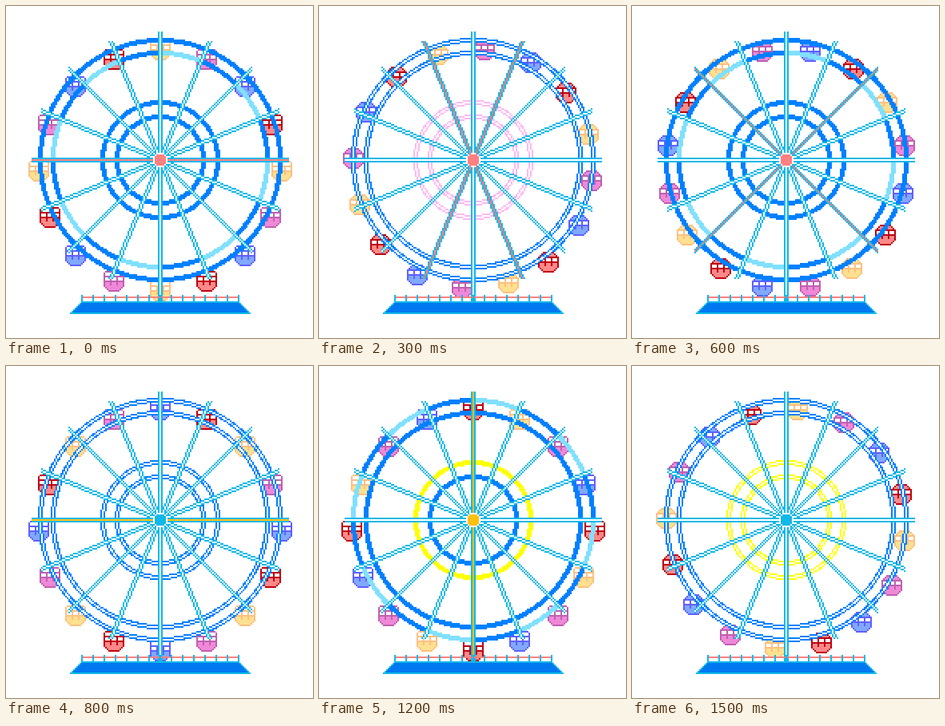
Recreate the animation shown at these times as an HTML page with a canvas. Size 384x416 px, loop 1.6 s.

```html
<!DOCTYPE html>
<html lang="en">
<head>
<meta charset="utf-8">
<title>Ferris wheel</title>
<style>
html, body { margin: 0; width: 100%; height: 100%; overflow: hidden; background: #fff; }
canvas { display: block; width: 384px; height: 416px; image-rendering: pixelated; }
</style>
</head>
<body>
<canvas width="192" height="208"></canvas>
<script>
const ctx = document.querySelector('canvas').getContext('2d');
const CX = 96, CY = 96, STEPS = 16, STEP_MS = 100, SECTOR = Math.PI / 8;
const BLUE = '#0080ff', GLOW = '#80e0ff', CYAN = '#10b8e8', WHITE = '#fff';
const PINK = '#ff8080', ORANGE = '#ffc010', ROSE = '#ffb8f0', YELLOW = '#ffff00';
const CABINS = [
  { line: '#ffc080', fill: '#ffe090' },
  { line: '#c060b0', fill: '#f088d8' },
  { line: '#6060ff', fill: '#80a8ff' },
  { line: '#c00010', fill: '#ff8888' }
];

function rect(x, y, w, h, color) {
  ctx.fillStyle = color;
  ctx.fillRect(x, y, w, h);
}

// Hanging cabin, 13 cells wide; the roof is left open when it lines up with a spoke.
function cabin(x, y, { line, fill }, open) {
  for (let row = 0; row < 13; row++) {
    const half = Math.min(6, (open ? 5 : 3) + row, 15 - row);
    const glass = open ? row < 6 : row > 2 && row < 6;
    const top = y - 6 + row;
    rect(x - half, top, half * 2 + 1, 1, glass ? WHITE : fill);
    if (row === 0 || row === 6 || row === 12 || row === 3) {
      rect(x - half, top, half * 2 + 1, 1, line);
    }
    rect(x - half, top, 1, 1, line);
    rect(x + half, top, 1, 1, line);
    if (row < 9 && row > 2) {
      rect(x - 2, top, 1, 1, line);
      rect(x + 2, top, 1, 1, line);
    }
  }
}

function cabins(step) {
  const open = step % 4 === 0;
  for (let i = 0; i < 16; i++) {
    const angle = (i - step / 4) * SECTOR;
    const r = Math.cos(angle) < -0.01 ? 74.5 : 75.6;
    const x = Math.round(CX + r * Math.sin(angle));
    const y = Math.round((open ? 103 : 102) - r * Math.cos(angle));
    cabin(x, y, CABINS[i % 4], open);
  }
}

// A ring is three cells thick; its middle cell shows only when it is lit.
function ring(radius, color, lit, chase = -1) {
  const edge = radius + 2;
  for (let y = -edge; y <= edge; y++) {
    for (let x = -edge; x <= edge; x++) {
      const k = Math.round(Math.hypot(x, y)) - radius;
      if (Math.abs(k) > 1) continue;
      const turn = (Math.atan2(x, -y) + 2 * Math.PI) % (2 * Math.PI);
      const glowing = lit && Math.floor(turn / SECTOR) % 2 === chase;
      rect(CX + x, CY + y, 1, 1, k === 0 && !lit ? WHITE : glowing ? GLOW : color);
    }
  }
}

function rings(step) {
  const lit = ![3, 7, 8, 15].includes(step);
  const late = step > 7;
  const chase = step % 2;
  let outer = BLUE, inner = BLUE;
  if (step === 3 || step === 7) outer = inner = ROSE;
  if (step === 15) outer = inner = YELLOW;
  if (late && lit) {
    if (step === 11 || step === 12) outer = YELLOW;
    else inner = YELLOW;
  }
  ring(75, BLUE, lit, late ? chase : -1);
  ring(67, BLUE, lit, late ? -1 : chase);
  ring(36, outer, lit);
  ring(27, inner, lit);
}

// Full diameter at an angle above the horizontal.
function spoke(index, core) {
  const angle = index * SECTOR;
  const dx = Math.cos(angle), dy = -Math.sin(angle);
  const steep = Math.abs(dy) > Math.abs(dx) + 0.01;
  const reach = Math.round(80 * Math.max(Math.abs(dx), Math.abs(dy)));
  const slope = steep ? dx / dy : dy / dx;
  for (const side of [-1, 1, 0]) {
    const color = side ? CYAN : core;
    const end = index === 4 ? 88 : reach;
    for (let a = -reach; a <= end; a++) {
      const b = Math.round(a * slope) + side;
      rect(CX + (steep ? b : a), CY + (steep ? a : b), 1, 1, color);
    }
  }
}

function litSpoke(step) {
  if (step === 15) return -1;
  return step === 4 || step === 12 ? 4 : step % 4;
}

function spokes(step) {
  const lit = litSpoke(step);
  const glow = step < 8 ? PINK : ORANGE;
  for (const i of [1, 7, 2, 6, 3, 5, 0, 4]) {
    spoke(i, i === lit || 8 - i === lit ? glow : WHITE);
  }
}

function disc(radius, color) {
  for (let y = -5; y <= 5; y++) {
    for (let x = -5; x <= 5; x++) {
      if (Math.hypot(x, y) <= radius) rect(CX + x, CY + y, 1, 1, color);
    }
  }
}

function hub(step) {
  disc(4.3, WHITE);
  disc(3.7, step === 8 || step === 15 ? CYAN : step < 8 ? PINK : ORANGE);
}

function base() {
  for (let x = 47; x < 146; x++) {
    const post = (x - 47) % 7 === 0;
    rect(x, 182, 1, 1, post ? CYAN : PINK);
    if (post) rect(x, 181, 1, 4, CYAN);
  }
  for (let row = 0; row < 8; row++) {
    const left = 47 - row, width = 99 + row * 2;
    rect(left, 185 + row, width, 1, row === 0 || row === 7 ? CYAN : '#0078f0');
    rect(left, 185 + row, 1, 1, CYAN);
    rect(left + width - 1, 185 + row, 1, 1, CYAN);
  }
}

let shown = -1;
function frame(now) {
  const step = Math.floor(now / STEP_MS) % STEPS;
  if (step !== shown) {
    shown = step;
    rect(0, 0, 192, 208, WHITE);
    cabins(step);
    rings(step);
    spokes(step);
    hub(step);
    base();
  }
  requestAnimationFrame(frame);
}
frame(performance.now());
</script>
</body>
</html>
```
